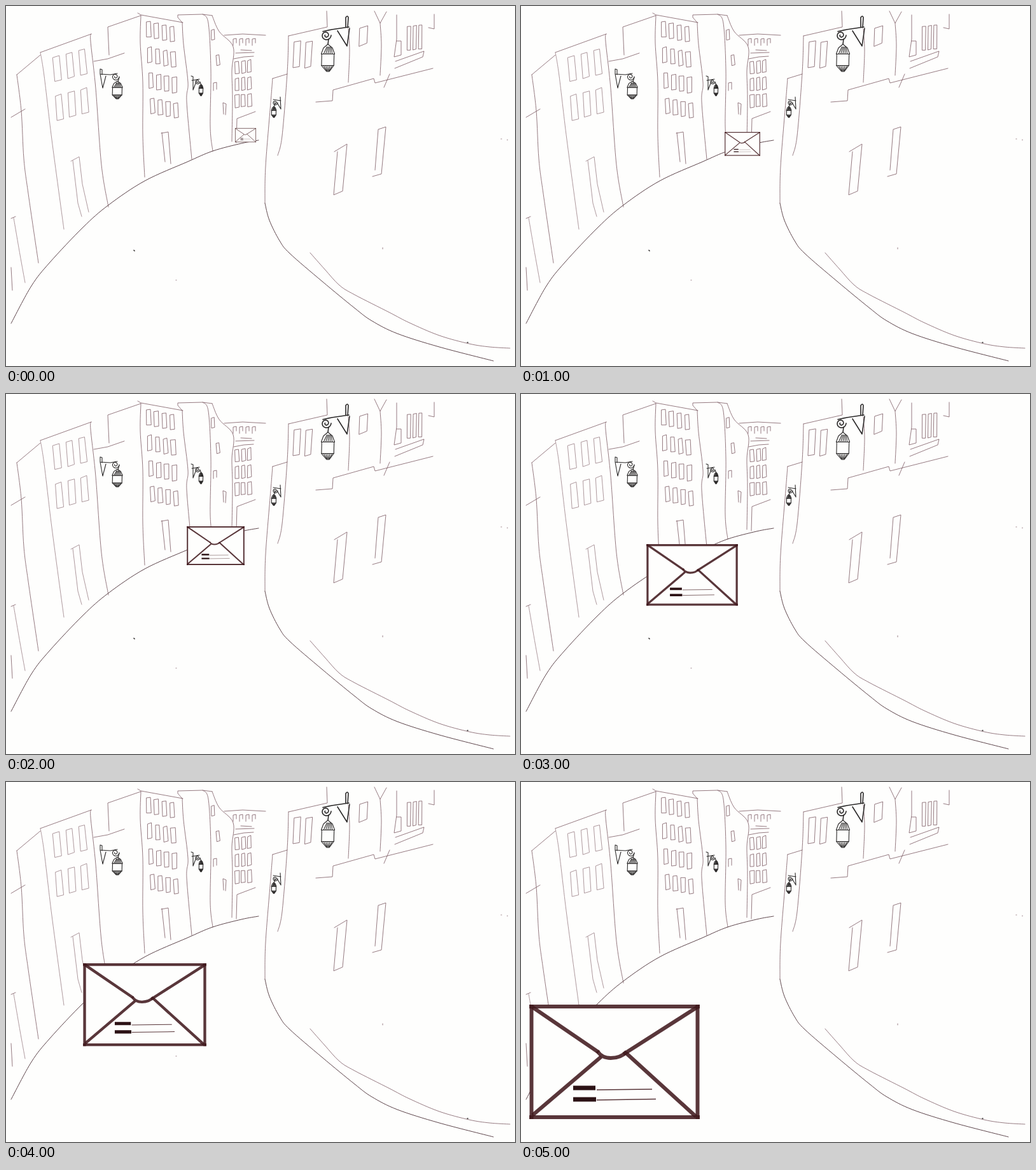
Write an HTML page that moves like this. It is 800 by 566 pixels and loops after 6000 ms.

```html
<!DOCTYPE html>
<html lang="en">
<head>
<meta charset="utf-8">
<title>Letter coming down the street</title>
<style>
  html, body { margin: 0; width: 100%; height: 100%; overflow: hidden; background: #fefefd; }
  svg { display: block; width: 100%; height: 100%; }
  #street path { fill: none; stroke: #7b5a62; stroke-width: .8; stroke-linejoin: round; stroke-linecap: round; }
  #street .faint { stroke: #9a7f86; }
  #street .road { stroke: #553b42; stroke-width: .95; }
  #street .iron { stroke: #2b2929; stroke-width: 1.1; }
  #street .bold { stroke-width: 1.6; }
  #letter path { fill: none; stroke: #41191d; stroke-opacity: .87; stroke-width: 6; }
  #letter .thin { stroke-width: 1.4; }
  #letter .bar { stroke: #2c1215; stroke-width: 7; stroke-opacity: 1; }
</style>
</head>
<body>
<svg viewBox="0 0 800 566" preserveAspectRatio="none">
  <g id="street"></g>
  <g id="letter">
    <rect x="1" y="1" width="266" height="178" fill="#fefefd"/>
    <path d="M0 3H268"/>
    <path d="M3.5 0V180"/>
    <path d="M264.5 0V180"/>
    <path d="M0 177H268"/>
    <path d="M5 4L109 75"/>
    <path d="M264 4L148 78"/>
    <path d="M107 73Q114 84 128 84Q144 84 153 74"/>
    <path d="M5 174L113 82"/>
    <path d="M152 76L262 176"/>
    <path class="bar" d="M69 131H104M69 149H105"/>
    <path class="thin" d="M106 134L193 133M106 150L199 148.5"/>
  </g>
</svg>
<script>
const street = document.getElementById('street');
const letter = document.getElementById('letter');

let seed = 7;
function wobble(size = 1.4) {
  seed = seed * 16807 % 2147483647;
  return (seed / 2147483647 - .5) * size;
}

function draw(d, className = '') {
  const path = document.createElementNS('http://www.w3.org/2000/svg', 'path');
  path.setAttribute('d', d);
  path.setAttribute('class', className);
  street.append(path);
}

// Smooth line through the given points (Catmull-Rom)
function curve(className, ...points) {
  const at = i => points[Math.max(0, Math.min(points.length - 1, i))];
  let d = `M${at(0)}`;
  for (let i = 0; i < points.length - 1; i++) {
    const handle = (p, before, after) => at(p).map((v, k) => v + (at(after)[k] - at(before)[k]) / 6);
    d += `C${handle(i, i - 1, i + 1)} ${handle(i + 1, i + 2, i)} ${at(i + 1)}`;
  }
  draw(d, className);
}

// Hand-drawn pane: the foot shifts sideways by lean, the right side goes up by rise
function pane(x, y, w, h, lean, rise, className) {
  const corners = [[x, y], [x + lean, y + h], [x + lean + w, y + h - rise], [x + w, y - rise]]
    .map(([cx, cy]) => [cx + wobble(), cy + wobble()]);
  draw(`M${corners.join('L')}Z`, className);
}

// Rows of panes; each column drops by slope, each row shifts by shift
function windows({ x, y, cols, rows, dx, dy, w, h, slope = 0, shift = 0, lean = 1, rise = 1, className }) {
  for (let r = 0; r < rows; r++)
    for (let c = 0; c < cols; c++)
      pane(x + c * dx + r * shift, y + r * dy + c * slope, w, h, lean, rise, className);
}

function lamp(bracket, hook, radius, hang, width, height, weight = '') {
  const iron = 'iron ' + weight;
  draw(bracket, iron);

  const turns = Array.from({ length: 30 }, (_, i) => {
    const r = radius * (1 - i / 36);
    return [hook[0] + r * Math.cos(i / 3), hook[1] + r * Math.sin(i / 3)];
  });
  curve(iron, ...turns);

  const at = (u, v) => [hang[0] + u * width, hang[1] + v * height];
  draw(`M${[at(0, 0), at(-.32, .14), at(-.48, .36), at(.48, .36), at(.32, .14)].join('L')}Z`, 'iron');
  draw(`M${[at(-.44, .36), at(-.46, .78), at(-.1, 1), at(.1, 1), at(.42, .78), at(.44, .36)].join('L')}`, 'iron');
  draw(`M${at(-.46, .78)}L${at(.42, .78)}`, 'iron');
  for (let u = -.3; u < .4; u += .15) {
    draw(`M${at(u, .35)}L${at(u * .5 + .08, .1)}`, 'iron');
    draw(`M${at(u, .79)}L${at(u * .3, .98)}`, 'iron');
  }
}

// Left row of houses
draw('M8 175L30 162M54 77L17 108M8 334L15 331M8 411L10 447');
curve('', [17, 108], [24, 165], [28, 240], [35, 295], [51, 404]);
curve('faint', [12, 333], [22, 391], [30, 435]);
draw('M54 73L134 44');
curve('faint', [54, 73], [60, 110], [72, 210], [91, 351]);
curve('', [134, 44], [133, 56], [141, 130], [150, 250], [161, 316]);
windows({ x: 74, y: 81, cols: 3, rows: 2, dx: 20, dy: 61, w: 10, h: 38, slope: -5, shift: 3, lean: 3, rise: 3, className: 'faint' });
draw('M102 244L115 237 120 280 130 324M105 243L113 310 119 331', 'faint');

draw('M138 87L160 83 186 74M162 77L160 33 212 15M207 11L212 14 278 26');
curve('', [212, 15], [211, 58], [215, 120], [215, 204], [218, 269]);
curve('', [277, 26], [279, 60], [286, 120], [284, 151], [292, 241]);
windows({ x: 220, y: 26, cols: 4, rows: 4, dx: 12.3, dy: 40, w: 7, h: 23, slope: 2.5, shift: 2 });
draw('M244 200L255 198 259 248M245 199L250 245');

draw('M277 26L270 18 270 14 309 13 324 15');
curve('', [324, 15], [335, 40], [357, 64], [355, 102], [356, 145], [355, 213]);
curve('', [309, 13], [318, 27], [322, 101], [321, 190], [325, 228]);
windows({ x: 322, y: 38, cols: 1, rows: 2, dx: 0, dy: 40, w: 5, h: 16, shift: 8 });
draw('M326 133L326 121 331 120 331 131M342 170L341 152 346 154 345 171');

// Far end of the street
draw('M343 46L372 44 408 46M369 69L386 70M361 74L390 73M358 83L374 80 389 79');
for (let x = 357; x < 390; x += 10) draw(`M${x} 62l0 -10 5 -1 0 7`);
windows({ x: 360, y: 88, cols: 3, rows: 3, dx: 9.7, dy: 26.5, w: 6, h: 19, slope: -1, lean: .5 });
draw('M362 215L363 177 392 166');

// Right side
draw('M442 107L419 114M504 8L505 33 444 47M579 8L588 27 598 9');
curve('', [419, 114], [416, 152], [408, 252], [407, 310]);
curve('', [444, 47], [442, 105], [434, 204], [427, 235]);
windows({ x: 453, y: 57, cols: 2, rows: 1, dx: 18, dy: 0, w: 10, h: 40, lean: -2, rise: 2 });
curve('', [538, 36], [540, 70], [538, 120]);
curve('', [588, 27], [590, 62], [588, 109]);
pane(556, 36, 12, 27, -1, 5);
draw('M614 14L614 52 610 80 621 77 621 55 614 55M673 13L673 36 664 34');
windows({ x: 631, y: 33, cols: 3, rows: 1, dx: 9, dy: 0, w: 5, h: 37, slope: -1, lean: -1 });
draw('M612 87L657 71 655 80 611 98');
draw('M487 151L513 149 514 132 578 114 580 121 671 98M603 107L594 128');
draw('M516 229L536 217 529 291 515 297 521 229M580 258L585 194 597 190 590 264 576 268');

// Kerbs
curve('road', [397, 211], [370, 216], [325, 228], [285, 245], [218, 275], [161, 313],
  [121, 348], [69, 403], [40, 440], [8, 499]);
curve('road', [407, 310], [414, 337], [430, 369], [446, 389], [497, 433], [548, 475], [575, 495],
  [615, 515], [681, 536], [766, 558]);
curve('', [478, 388], [501, 414], [524, 439], [548, 454], [603, 482], [634, 498],
  [681, 518], [728, 531], [760, 536], [792, 538]);

// Street lamps
lamp('M498 40L512 37 539 33M534 33L534 18Q537 14 538 18L537 34M521 39L536 63 540 35M507 52L506 60',
  [503, 46], 8, [506, 60], 22, 43, 'bold');
lamp('M148 107L148 99 151 100 151 108M148 107L152 129 157 110M148 107L164 108 175 106M178 112L176 119',
  [172, 111], 6, [175, 118], 17, 28);
lamp('M291 110L294 111 294 132 299 119M292 117L304 115M305 120L307 124', [301, 119], 4, [306.5, 123], 7, 18);
lamp('M420 147L432 149M431 143L432 162 426 152M423 153L421 159', [423, 152], 4, [421, 158], 8, 17);

// Specks on the paper
draw('M201 384l1 1M725 529h1', 'iron bold');
draw('M778 209h1M788 210v1M267 431h1M592 380v2');

// Left, top and width of the letter for each second
const stops = [[360, 192, 33], [320, 198, 56], [284, 208, 91], [197, 236, 144], [121, 285, 194], [13, 350, 268]];

function frame() {
  const [x, y, width] = stops[Math.floor(performance.now() / 1000) % stops.length];
  letter.setAttribute('transform', `translate(${x} ${y}) scale(${width / 268})`);
  requestAnimationFrame(frame);
}
frame();
</script>
</body>
</html>
```
